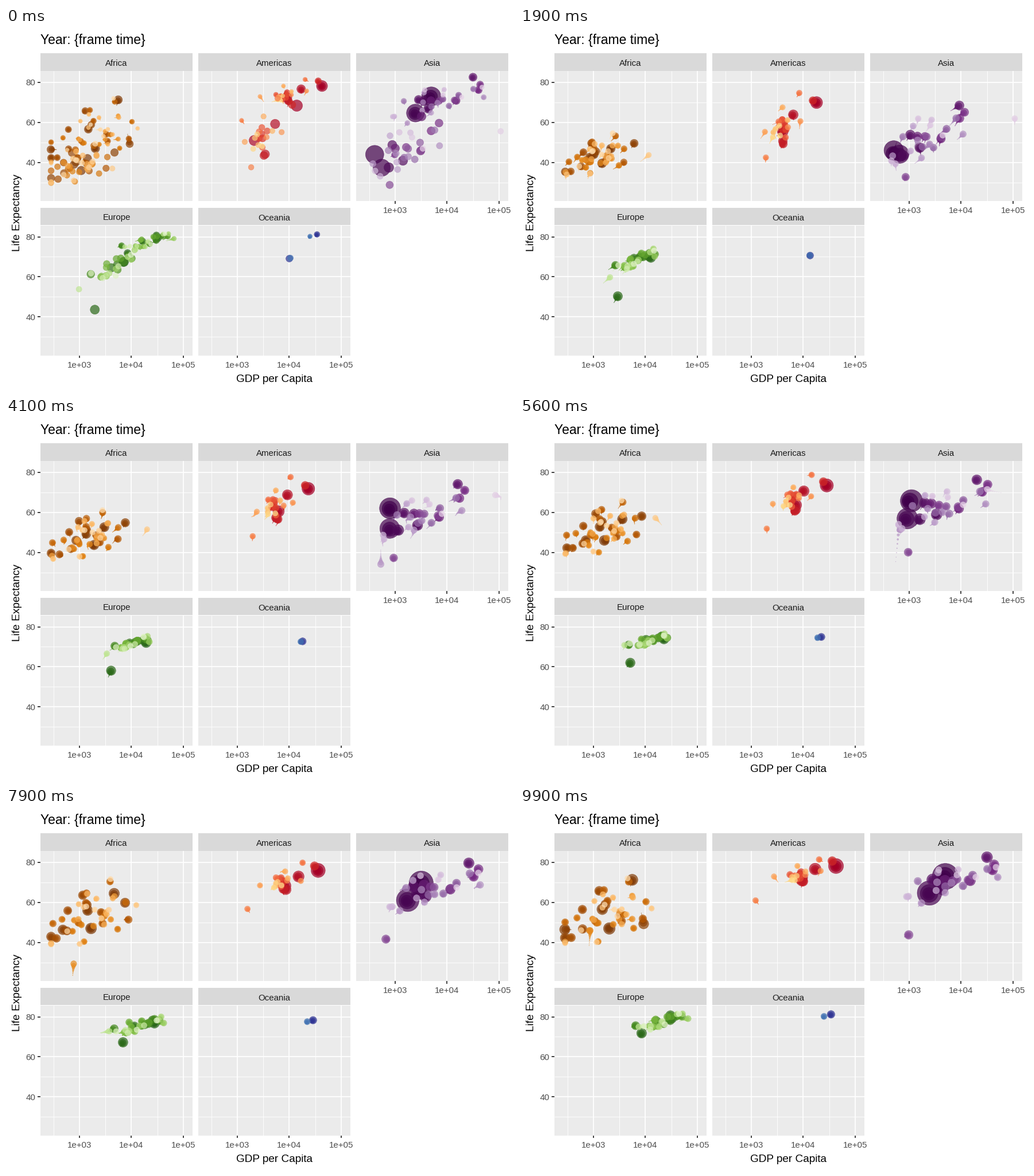
A matplotlib script for the animation above (10 s loop, 885 by 632 pixels).

```python
import numpy as np
import matplotlib.pyplot as plt
from matplotlib.animation import FuncAnimation
from matplotlib.colors import LinearSegmentedColormap
from matplotlib.patches import Rectangle

W, H, DPI = 885, 632, 100
PX = 72 / DPI                 # points per pixel
FRAMES, WAKE = 100, 10
YEARS = np.linspace(52, 107, FRAMES)      # since 1900
STEPS = np.arange(52, 108, 5)             # motion is linear between these
PANEL_W, PANEL_H = 265, 227
TOP, LOW = 75, 344.5

rng = np.random.default_rng(7)
plt.rcParams["font.family"] = "Liberation Sans"
fig = plt.figure(figsize=(W / DPI, H / DPI), dpi=DPI, facecolor="white")
ax = fig.add_axes([0, 0, 1, 1])
ax.set_xlim(0, W)
ax.set_ylim(H, 0)
ax.axis("off")


def keyed(stops):
    """Columns of (year, ...) stops, sampled at every step."""
    year, *cols = np.array(stops, float).T
    return [np.interp(STEPS, year, c) for c in cols]


class Group:
    """A cloud of countries, ranked by population, that drifts and spreads.

    drift: (year, mean log income, its spread, mean life span, its spread)
    leads: rank -> (year, income, life span) stops of a few leading countries
    """

    def __init__(self, name, left, top, count, colors, big, decay, growth,
                 corr=0, drift=(), leads=None):
        self.name, self.left, self.top = name, left, top
        self.count, self.corr = count, corr
        self.cmap = LinearSegmentedColormap.from_list(name, colors)
        self.big, self.decay, self.growth = big, decay, growth
        self.drift, self.leads = drift, leads or {}

    def path(self, rank):
        if rank in self.leads:
            income, life = keyed(self.leads[rank])
            return np.log10(income), life
        mean, spread, life, life_spread = keyed(self.drift)
        z, own = np.clip(rng.normal(size=2), -1.8, 1.8)
        mix = self.corr * z + np.sqrt(1 - self.corr ** 2) * own
        wobble = rng.normal(size=(2, len(STEPS)))
        income = mean + spread * z + 0.035 * wobble[0]
        life = life + life_spread * mix + 0.5 * wobble[1]
        return np.maximum(income, 2.45), np.clip(life, 29, 81.5)

    def size(self, rank):
        big = self.big[rank] if rank < len(self.big) else self.big[-1]
        excess = big * np.exp(-rank / self.decay)
        return 2 + excess * self.growth ** ((107 - YEARS) / 110)

    def tracks(self):
        for rank in range(self.count):
            income, life = (np.interp(YEARS, STEPS, v) for v in self.path(rank))
            color = self.cmap(rank / (self.count - 1))[:3] + (0.7,)
            yield self.x(income), self.y(life), self.size(rank), color

    def x(self, log_income):
        return self.left + 68.2 + 90.2 * (log_income - 3)

    def y(self, life):
        return self.top + 20 + 3.495 * (80 - life)


GROUPS = [
    Group("Africa", 60, TOP, 52,
          ["#7F3B08", "#B35806", "#E08214", "#FDB863", "#FEE0B6"], [3.1], 14, .27, .5,
          [(52, 2.94, .3, 39, 5), (67, 3.06, .32, 45, 5.5), (82, 3.14, .38, 51.5, 7),
           (92, 3.12, .42, 53.6, 8.5), (107, 3.2, .46, 54.5, 8.5)],
          {0: [(52, 1077, 36), (77, 1982, 44.5), (87, 1385, 47), (107, 2014, 47)],
           1: [(52, 1419, 42), (82, 3503, 56), (107, 5581, 71.3)],
           3: [(52, 781, 39), (72, 905, 46), (107, 278, 46.5)],
           4: [(52, 4725, 45), (82, 8568, 58), (97, 7479, 60), (107, 9270, 49.3)],
           28: [(52, 493, 40), (87, 848, 44), (92, 737, 23.6), (107, 863, 46)],
           44: [(52, 4293, 37), (77, 21746, 53), (87, 11864, 60), (107, 13206, 57)]}),
    Group("Americas", 335, TOP, 25,
          ["#A50026", "#D73027", "#F46D43", "#FDAE61", "#FEE090"], [4.7], 5, .4, .65,
          [(52, 3.47, .19, 53, 8), (67, 3.62, .2, 60, 7), (82, 3.78, .2, 66.5, 5.2),
           (107, 3.9, .24, 73.5, 3.2)],
          {0: [(52, 13990, 68.4), (72, 21806, 71.3), (107, 42952, 78.2)],
           1: [(52, 2109, 51), (77, 6660, 61.5), (107, 9066, 72.4)],
           5: [(52, 11367, 68.8), (72, 18971, 72.9), (107, 36319, 80.7)],
           14: [(52, 1840, 37.6), (82, 2011, 51.5), (107, 1202, 61)]}),
    Group("Asia", 610, TOP, 33,
          ["#40004B", "#762A83", "#9970AB", "#C2A5CF", "#E7D4E8"], [10, 9.9, 4], 14, .39,
          .75,
          [(52, 3.2, .34, 47.5, 8), (67, 3.4, .42, 56, 8), (82, 3.62, .48, 63.5, 6.5),
           (107, 3.82, .5, 71.5, 5)],
          {0: [(52, 400, 44), (57, 576, 50.5), (62, 488, 44.5), (67, 613, 58.4),
               (82, 962, 65.5), (107, 4959, 73)],
           1: [(52, 547, 37.4), (67, 701, 47), (82, 856, 56.6), (107, 2452, 64.7)],
           2: [(52, 750, 37.5), (67, 762, 46), (82, 1517, 56), (107, 3541, 70.7)],
           5: [(52, 3217, 63), (72, 14779, 73.4), (107, 31656, 82.6)],
           12: [(52, 779, 28.8), (82, 978, 40), (97, 635, 41.8), (107, 975, 43.8)],
           22: [(52, 369, 39.4), (67, 523, 45), (77, 525, 31), (82, 624, 51),
                (107, 1714, 59.7)],
           31: [(52, 108382, 55.6), (72, 109348, 67.7), (82, 31354, 71.3),
                (107, 47307, 77.6)]}),
    Group("Europe", 60, LOW, 30,
          ["#276419", "#4D9221", "#7FBC41", "#B8E186", "#E6F5D0"], [2.45], 11, .72, .85,
          [(52, 3.68, .26, 65, 4.5), (67, 3.92, .22, 70, 2.3), (82, 4.1, .2, 73, 1.8),
           (92, 4.1, .32, 74.5, 2.6), (107, 4.34, .25, 77.8, 2.6)],
          {0: [(52, 7144, 67.5), (77, 20512, 72.5), (107, 32170, 79.4)],
           1: [(52, 1969, 43.6), (77, 4269, 59.5), (107, 8458, 71.8)],
           2: [(52, 7030, 67.4), (77, 18292, 73.8), (107, 30470, 80.7)],
           23: [(52, 974, 53.8), (82, 4126, 70.7), (92, 2547, 72), (107, 7446, 75)]}),
    Group("Oceania", 335, LOW, 2, ["#313695", "#4575B4"], [1.2], 1.1, .43,
          leads={0: [(52, 10040, 69.1), (72, 16789, 72), (107, 34435, 81.2)],
                 1: [(52, 10557, 69.4), (72, 16046, 71.9), (107, 25185, 80.2)]}),
]


def label(x, y, s, size, color="black", ha="center", va="baseline", **kw):
    ax.text(x, y, s, fontsize=size * PX, color=color, ha=ha, va=va, **kw)


def line(xs, ys, color="white", width=1.8):
    ax.plot(xs, ys, color=color, lw=width * PX, zorder=2, solid_capstyle="butt")


def draw_panel(g):
    right, bottom = g.left + PANEL_W, g.top + PANEL_H
    ax.add_patch(Rectangle((g.left, g.top), PANEL_W, PANEL_H, fc="#EBEBEB", lw=0))
    ax.add_patch(Rectangle((g.left, g.top - 31), PANEL_W, 30.5, fc="#D9D9D9", lw=0))
    label(g.left + PANEL_W / 2, g.top - 9, g.name, 15, "#1A1A1A")
    for life in range(30, 81, 10):
        y, major = g.y(life), life % 20 == 0
        line([g.left, right], [y, y], width=1.8 if major else 0.9)
        if major and g.left == 60:
            line([55.3, 60], [y, y], "#333333")
            label(51.5, y + 5.5, str(life), 15, "#4D4D4D", "right")
    for half in range(5, 11):
        x, major = g.x(half / 2), half % 2 == 0
        line([x, x], [g.top, bottom], width=1.8 if major else 0.9)
        if major and (g.top == LOW or g.name == "Asia"):
            line([x, x], [bottom, bottom + 4.7], "#333333")
            label(x, bottom + 21.3, f"1e+0{half // 2}", 15, "#4D4D4D")


for group in GROUPS:
    draw_panel(group)
label(60, 28, "Year: {frame time}", 22.9, ha="left")
label(467.5, 618, "GDP per Capita", 19)
label(20, 323, "Life Expectancy", 19.1, rotation=90, va="center")

tracks = [t for g in GROUPS for t in g.tracks()]
rng.shuffle(tracks[2:])
xs, ys, sizes, colors = zip(*tracks)
xs, ys, sizes = (np.array(a).T for a in (xs, ys, sizes))   # time by point
falloff = (np.arange(1, WAKE + 1) / WAKE) ** 3             # oldest to newest
shades = np.tile(colors, (WAKE, 1))
dots = ax.scatter(np.zeros(len(shades)), np.zeros(len(shades)), s=1, zorder=3,
                  facecolors=shades, edgecolors=shades, linewidths=0.6 * PX)


def update(i):
    wake = np.arange(i - WAKE + 1, i + 1) % FRAMES
    radius = 0.3 + 0.64 * (sizes[wake] * 2.845 + 0.945) * falloff[:, None]
    dots.set_offsets(np.column_stack([xs[wake].ravel(), ys[wake].ravel()]))
    dots.set_sizes((2 * radius.ravel() * PX) ** 2)
    return dots,


anim = FuncAnimation(fig, update, frames=FRAMES, interval=100, repeat=True,
                     repeat_delay=0, init_func=lambda: update(0))
plt.show()
```
